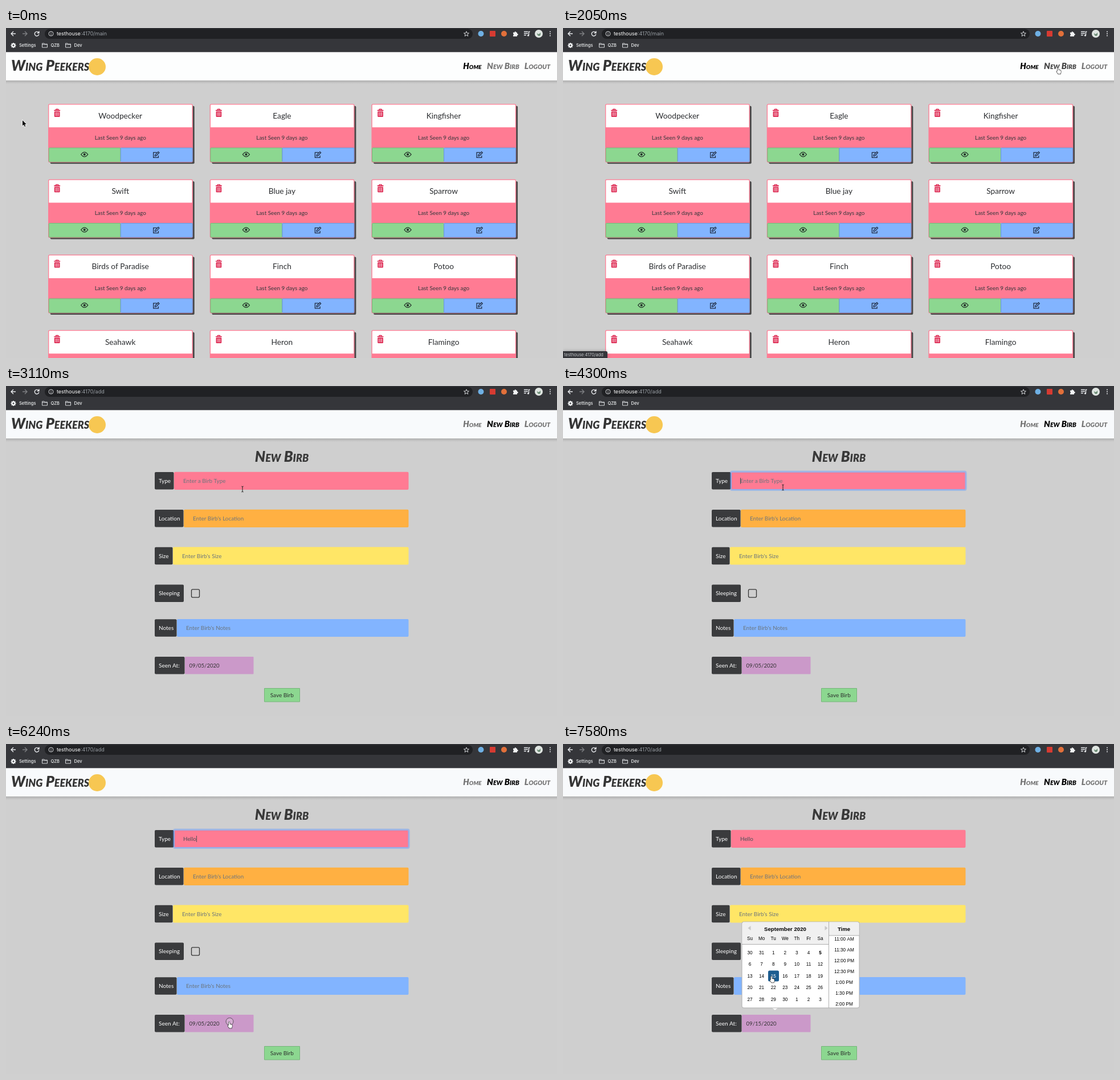
An HTML page with a canvas that plays this animation: 967x579 px, repeating every 8000 ms.

```html
<!DOCTYPE html>
<html lang="en">
<head>
<meta charset="utf-8">
<title>Bird log</title>
<style>
html, body { margin: 0; width: 100%; height: 100%; overflow: hidden; background: #cfcfcf; }
canvas { display: block; }
</style>
</head>
<body>
<canvas id="stage" width="967" height="579"></canvas>
<script>
const ctx = document.getElementById('stage').getContext('2d');
const LOOP = 8000;
const PINK = '#ff7b93', GREEN = '#8cd790', BLUE = '#82b4ff', DARK = '#3a3b3d';
const body = size => `${size}px Lato, sans-serif`;
const marker = size => `italic small-caps 900 ${size}px Lato, sans-serif`;
const chrome = (size, weight = 400) => `${weight} ${size}px Inter, sans-serif`;
const arial = (size, weight = 400) => `${weight} ${size}px "Liberation Sans", Arial, sans-serif`;

const HOST = 'testhouse';
const BIRDS = ['Woodpecker', 'Eagle', 'Kingfisher', 'Swift', 'Blue jay', 'Sparrow',
  'Birds of Paradise', 'Finch', 'Potoo', 'Seahawk', 'Heron', 'Flamingo'];

// Pointer stops: start time, x, y, shape; each is held until the next.
const POINTER = [
  [0, 29, 162, 'arrow'], [150, 330, 118, 'arrow'], [290, 613, 79, 'arrow'],
  [580, 690, 112, 'arrow'], [730, 755, 172, 'arrow'], [870, 792, 207, 'hand'],
  [1020, 818, 219, 'hand'], [1160, 847, 212, 'hand'], [1310, 873, 108, 'arrow'],
  [1460, 872, 90, 'arrow'], [1600, 869, 73, 'arrow'], [1750, 866, 69, 'hand'],
  [2490, 845, 88, 'arrow'], [2640, 750, 125, 'arrow'], [2790, 610, 158, 'beam'],
  [2930, 490, 174, 'beam'], [3080, 415, 176, 'beam'], [3230, 386, 173, 'beam'],
  [5490, 402, 235, 'beam'], [5640, 440, 345, 'arrow'], [5790, 412, 450, 'arrow'],
  [5940, 389, 487, 'hand'], [6840, 480, 438, 'hand'], [6990, 428, 398, 'hand'],
  [7140, 363, 407, 'hand']
];
const SHAPES = {
  arrow: new Path2D('M0 0V9.5L2.2 7.5L3.8 11L5.3 10.4L3.8 7H6.8Z'),
  hand: new Path2D('M1.8 6V1a.9.9 0 0 1 1.8 0V4l3 .7q1.2.3 1.2 1.5V8.5L7 11H3L.4 7.4q-.3-1.2 1.4-1.4Z'),
  beam: new Path2D('M-1.7 0Q0 0 0 1.2Q0 0 1.7 0M0 1V9M-1.7 10Q0 10 0 8.8Q0 10 1.7 10')
};
const EYE = new Path2D('M-6 0Q0-8 6 0Q0 8-6 0Z');
const PENCIL = new Path2D('M1.5-4H-4.5V5H4.2V1.5M-1.8 2.4L-1.5.2L4-5.2L5.7-3.5L.3 2Z');

let now = 0;
const during = (start, end) => now >= start && now < end;

function box(x, y, w, h, fill, radius = 0, stroke, line = 1) {
  ctx.beginPath();
  ctx.roundRect(x, y, w, h, radius);
  if (fill) { ctx.fillStyle = fill; ctx.fill(); }
  if (stroke) { ctx.strokeStyle = stroke; ctx.lineWidth = line; ctx.stroke(); }
}
function disc(x, y, r, fill, stroke, line = 1) {
  box(x - r, y - r, 2 * r, 2 * r, fill, r, stroke, line);
}
function text(str, x, y, font, color, align = 'left') {
  ctx.font = font;
  ctx.fillStyle = color;
  ctx.textAlign = align;
  ctx.fillText(str, x, y);
}
function path(d, x, y, fill, stroke, line = 1) {
  const shape = d instanceof Path2D ? d : new Path2D(d);
  ctx.save();
  ctx.translate(x, y);
  if (stroke) { ctx.strokeStyle = stroke; ctx.lineWidth = line; ctx.stroke(shape); }
  if (fill) { ctx.fillStyle = fill; ctx.fill(shape); }
  ctx.restore();
}

function browserBar(address) {
  box(0, 0, 967, 42.5, '#35363a');
  box(68, 1.5, 751, 17.5, '#202124', 9);
  path('M4 0H-4M0-4L-4 0L0 4', 13, 10, null, '#e8eaed', 1.4);
  path('M-4 0H4M0-4L4 0L0 4', 33, 10, null, '#7d7f82', 1.4);
  path('M3.2-2A3.8 3.8 0 1 0 3.8 1M4-4.5V-1.2H.7', 54, 10, null, '#e8eaed', 1.4);
  disc(79, 10, 4, null, '#d0d2d5');
  box(78.5, 9.5, 1, 3, '#d0d2d5');
  box(78.5, 7.5, 1, 1, '#d0d2d5');
  text(HOST, 89, 13.3, chrome(9), '#fff');
  text(address, 89 + ctx.measureText(HOST).width, 13.3, chrome(9), '#9aa0a6');

  path('M0-4.5L1.2-1.4L4.5-1.3L1.9.7L2.8 4L0 2.1L-2.8 4L-1.9.7L-4.5-1.3L-1.2-1.4Z', 808, 10.3, null, '#d0d2d5');
  disc(833.5, 10, 5, '#6fb0e4');
  box(849, 5, 10, 10, '#d63b32', 1);
  disc(874, 10, 5, '#e2703a');
  path('M-4-2H-1.5A1.4 1.4 0 1 1 1.3-2H3V.3A1.4 1.4 0 1 1 3 3V5H-4V3A1.4 1.4 0 0 0-4 .3Z', 894, 9.7, '#f1f3f4');
  path('M-5-3.5H2M-5-.5H2M-5 2.5H-1M3.5 3V-3.5H5.5', 914, 10, null, '#e8eaed', 1.4);
  disc(916.5, 13, 1.6, '#e8eaed');
  disc(935, 10, 7, '#dfe5e1');
  path('M-3-1Q0 3 3-2Q4 4 0 4Q-3 3-3-1Z', 935, 10, '#6b8c75');
  for (const y of [6.5, 10, 13.5]) disc(955, y, 1, '#e8eaed');

  for (let i = 0; i < 4; i++) {
    ctx.save();
    ctx.translate(13, 30.5);
    ctx.rotate(i * Math.PI / 4);
    box(-1, -4.5, 2, 9, '#f1f3f4');
    ctx.restore();
  }
  disc(13, 30.5, 2.3, '#35363a', '#f1f3f4', 2);
  text('Settings', 23, 33.2, chrome(7.5, 500), '#f1f3f4');
  [[68, 'QZB'], [109, 'Dev']].forEach(([x, name]) => {
    path('M-4.5-3.5H-1L0-2.3H4.5V3.5H-4.5ZM-4.5-1.5H4.5', x, 30.5, null, '#d8dadd');
    text(name, x + 10.5, 33.2, chrome(7.5, 500), '#f1f3f4');
  });
}

function navBar(home) {
  const shade = ctx.createLinearGradient(0, 92, 0, 98);
  shade.addColorStop(0, '#b0b0b0');
  shade.addColorStop(1, '#cfcfcf');
  box(0, 92, 967, 6, shade);
  box(0, 42.5, 967, 49.5, home ? '#fdfefe' : '#f8fafc');
  text('Wing Peekers', 9, 75.3, marker(25.4), '#353535');
  disc(160, 68, 15, '#f7c752');
  const hovered = during(1750, 2190);
  text('Home', 818.5, 72, marker(14.5), home ? '#000' : '#707070', 'center');
  text('New Birb', 872.5, 72, marker(15), home ? (hovered ? '#444' : '#777') : '#000', 'center');
  text('Logout', 932.5, 72, marker(15.2), '#777', 'center');
}

function card(name, x, y, editHover) {
  const mid = x + 126;
  box(x + 3, y + 3, 253, 101.5, '#484848', 2);
  box(x, y, 252.5, 101.5, '#fff', 2, PINK, 1.3);
  box(x, y + 40.5, 252.5, 36, PINK);
  box(x + .5, y + 76.5, 126, 24.5, GREEN, 1, '#74b57a');
  box(x + 126.5, y + 76.5, 126, 24.5, editHover ? '#709ee2' : BLUE, 1, '#6996d8');
  text(name, mid, y + 24.8, body(13.7), '#2b2d30', 'center');
  text('Last Seen 9 days ago', mid, y + 62, body(9.9), '#33373b', 'center');

  box(x + 9.5, y + 10, 11, 1.6, '#dc1f4a', .6);
  box(x + 12.8, y + 8.6, 4.4, 2, null, .5, '#dc1f4a', 1.2);
  box(x + 10.2, y + 12.6, 9.6, 9.6, '#dc1f4a', 1);
  for (const dx of [12.2, 14.6, 17]) box(x + dx, y + 14, .9, 6.8, '#fff');

  path(EYE, x + 63, y + 88, null, '#26332b', 1.3);
  disc(x + 63, y + 88, 2.1, '#26332b');
  path(PENCIL, x + 188.5, y + 88.5, null, '#222f45', 1.3);
}

function field(label, y, split, color, hint, value) {
  box(261, y, split - 261.5, 30.5, DARK, 2);
  text(label, 268, y + 18.8, body(10), '#fff');
  if (color) box(split, y - .3, 706.5 - split, 31.2, color, 2);
  text(value || hint, split + 16, y + 18.8, body(9.9), value ? '#495057' : '#6c757d');
}

function typeFocus(typed) {
  if (during(3410, 6390)) {
    box(294, 149.7, 413.6, 33.2, null, 3, 'rgba(90,150,255,.4)', 2.2);
    box(295.5, 151.2, 410.6, 30.2, null, 2, '#80b0fa');
  }
  if (during(3410, 3860) || during(4300, 5790) || during(6240, 6390)) {
    ctx.font = body(9.9);
    box(Math.round(311 + ctx.measureText(typed).width), 161, 1, 11, '#5a5258');
  }
}

function calendar() {
  const chosen = now < 7430 ? 6 : 16;
  path('M-6 0H6L0 4.5Z', 372, 462.5, '#fff', '#b5b5b5', .6);
  box(314, 312, 206, 151, '#fff', 3, '#aeaeae');
  box(314.5, 312.5, 152, 39, '#f0f0f0', [3, 0, 0, 0]);
  box(467, 312.5, 52.5, 23.5, '#f0f0f0', [0, 3, 0, 0]);
  box(314, 351, 152.5, 1, '#aeaeae');
  box(467, 335.5, 53, 1, '#aeaeae');
  box(466, 312, 1, 151, '#aeaeae');
  path('M2.5-4V4L-2.5 0Z', 327, 323, '#c8c8c8');
  path('M-2.5-4V4L2.5 0Z', 462, 323, '#c8c8c8');
  text('September 2020', 390, 327.7, arial(9.65, 700), '#000', 'center');
  text('Time', 493, 327.7, arial(9.6, 700), '#000', 'center');
  const column = i => 328 + 20.6 * i;
  ['Su', 'Mo', 'Tu', 'We', 'Th', 'Fr', 'Sa'].forEach((d, i) =>
    text(d, column(i), 343.8, arial(8.2), '#000', 'center'));
  for (let i = 0; i < 35; i++) {
    const x = column(i % 7), y = 366 + 20.45 * Math.floor(i / 7);
    const day = i < 2 ? 30 + i : (i - 2) % 30 + 1;
    const active = i === chosen;
    if (active) box(x - 9.2, y - 9.5, 19, 19, i === 16 ? '#1d5d90' : '#216ba5', 2.5);
    text(day, x, y + 3, arial(8.2, i === 6 ? 700 : 400), active ? '#fff' : '#000', 'center');
  }
  ctx.save();
  ctx.beginPath();
  ctx.rect(467, 336.5, 52.5, 126);
  ctx.clip();
  if (during(6840, 6990)) box(467, 428, 52.5, 19, '#f0f0f0');
  for (let i = 0; i < 7; i++) {
    const half = 22 + i, hour = Math.floor(half / 2);
    const label = `${(hour + 11) % 12 + 1}:${half % 2 ? '30' : '00'} ${hour < 12 ? 'AM' : 'PM'}`;
    text(label, 493.5, 345.3 + 19 * i, arial(8.2), '#000', 'center');
  }
  ctx.restore();
}

function form() {
  const letters = [4600, 4750, 4750, 5050, 5190].filter(t => now >= t).length;
  const typed = 'Hello'.slice(0, letters);
  text('New Birb', 484, 132.5, marker(25.4), '#393939', 'center');
  field('Type', 151, 295, PINK, 'Enter a Birb Type', typed);
  typeFocus(typed);
  field('Location', 217, 312, '#ffb042', "Enter Birb's Location");
  field('Size', 282.7, 293, '#ffe666', "Enter Birb's Size");
  field('Sleeping', 348.6, 312.5, null, '');
  box(325.5, 356.8, 14, 14, null, 2, '#333', 1.3);
  field('Notes', 409.2, 300, BLUE, "Enter Birb's Notes");
  field('Seen At:', 475, 314, null, '');
  box(314, 475, 120.5, 30.5, '#cb99c9', 1);
  if (during(6390, 7430)) box(314, 474.5, 120.5, 31.5, null, 2, '#87a8e0', 2);
  text(now < 7430 ? '09/05/2020' : '09/15/2020', 321.5, 493.7, body(9.6), '#333');
  box(453.5, 530.5, 62, 23.5, GREEN, 0, '#76b57a');
  text('Save Birb', 484.2, 545.5, body(10), '#2b2f2c', 'center');
  if (now >= 6390) calendar();
}

function statusBubble() {
  if (!during(2050, 2490)) return;
  const width = now < 2190 ? 78 : 322;
  ctx.save();
  ctx.shadowColor = 'rgba(0,0,0,.25)';
  ctx.shadowBlur = 6;
  box(0, 567, width, 14, '#35363a', [0, 3, 0, 0]);
  ctx.restore();
  text(HOST + ':4170/add', 2, 576.4, chrome(7.4), '#c4c7ca');
}

function pointer() {
  const [, x, y, shape] = POINTER.findLast(stop => stop[0] <= now);
  if (during(6240, 6390) || during(7430, 7580))
    disc(x + 3.5, y, 6.5, 'rgba(255,255,255,.2)', '#5c525c');
  if (shape === 'arrow') path(SHAPES.arrow, x, y, '#000', '#fff', 1.4);
  else if (shape === 'hand') path(SHAPES.hand, x, y + .5, '#fff', '#222', 1.3);
  else path(SHAPES.beam, x, y, null, '#222');
}

function draw(time) {
  now = time % LOOP;
  const home = now < 2190;
  box(0, 0, 967, 579, '#cfcfcf');
  browserBar(home ? ':4170/main' : ':4170/add');
  navBar(home);
  if (home) {
    BIRDS.forEach((name, i) => card(name, 74.7 + 283.7 * (i % 3),
      133.8 + 132.3 * Math.floor(i / 3), i === 2 && during(870, 1460)));
  } else form();
  statusBubble();
  pointer();
}

const start = performance.now();
function tick() {
  draw(performance.now() - start);
  requestAnimationFrame(tick);
}
tick();
</script>
</body>
</html>
```
